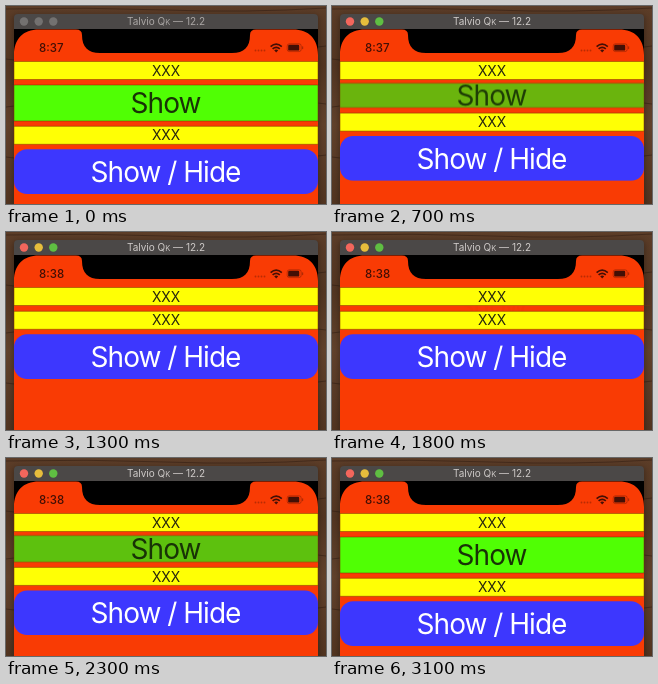
Animation, 320 px wide and 198 px high, one loop 3.2 s. Source, as an HTML page:

```html
<!DOCTYPE html>
<html lang="en">
<head>
<meta charset="utf-8">
<title>Collapsing stack</title>
<style>
  html, body { margin: 0; width: 100%; height: 100%; overflow: hidden; background: #573924; }
  svg { display: block; width: 100%; height: 100%; }
  text { font-family: Inter, Roboto, sans-serif; text-anchor: middle; }

  .wood path { fill: none; stroke: #2c1a10; stroke-width: 1; opacity: .5; }
  .bar { fill: #4b4847; }
  .title { font-size: 10px; fill: #aaa6a4; }
  .lights circle { fill: #737170; }
  .row { fill: #ffff05; }
  .edge { stroke: #7d3200; stroke-opacity: .5; stroke-width: 1; vector-effect: non-scaling-stroke; }
  .label { font-size: 13.8px; fill: #25240e; }
  .big { font-size: 28px; letter-spacing: -.035em; }
  .status { fill: #430f05; }
  .clock { font-size: 11.5px; font-weight: 500; text-anchor: start; }

  .title, .lights circle, .clock, .below, .panel, .caption {
    animation: 3200ms linear infinite;
  }
  .title { animation-name: focus-title; }
  .lights circle { animation-name: focus-light; }
  .before { animation-name: before; }
  .after { animation-name: after; }
  .below { animation-name: slide; animation-timing-function: ease-in-out; }
  .panel { animation-name: fold, tint; animation-timing-function: ease-in-out, linear; }
  .caption { animation-name: lift, fade; animation-timing-function: ease-in-out, linear; }

  @keyframes focus-title { 0%, 18.7% { fill: #aaa6a4 } 18.75%, 100% { fill: #cecac8 } }
  @keyframes focus-light { 0%, 18.7% { fill: #737170 } 18.75%, 100% { fill: var(--on) } }
  @keyframes before { 0%, 34.3% { opacity: 1 } 34.35%, 100% { opacity: 0 } }
  @keyframes after { 0%, 34.3% { opacity: 0 } 34.35%, 100% { opacity: 1 } }

  /* Collapse at 520–980 ms, expand at 1780–2590 ms. */
  @keyframes slide {
    0%, 16.25%, 80.94%, 100% { transform: translateY(0) }
    30.625%, 55.625% { transform: translateY(-41px) }
  }
  @keyframes fold {
    0%, 16.25%, 80.94%, 100% { transform: translateY(79px) scaleY(1) }
    30.625%, 55.625% { transform: translateY(73.5px) scaleY(0) }
  }
  @keyframes lift {
    0%, 16.25%, 80.94%, 100% { transform: translateY(0) }
    30.625%, 55.625% { transform: translateY(-23.5px) }
  }
  @keyframes tint {
    0%, 16.25%, 80.94%, 100% { fill: #50ff04; stroke-opacity: .5 }
    21.4%, 71.875% { fill: #5dc10e; stroke-opacity: .4 }
    26.6%, 62.5% { fill: #e03b04; stroke-opacity: 0 }
    30.625%, 55.625% { fill: #f93b04; stroke-opacity: 0 }
  }
  @keyframes fade {
    0%, 21.4%, 71.875%, 100% { opacity: 1 }
    26.6%, 62.5% { opacity: .14 }
    28.1%, 55.625% { opacity: 0 }
  }
</style>
</head>
<body>
<svg viewBox="0 0 320 198" preserveAspectRatio="none">
  <defs>
    <linearGradient id="wood" x2="0" y2="1">
      <stop offset="0" stop-color="#5c3d28"/>
      <stop offset=".3" stop-color="#533622"/>
      <stop offset=".6" stop-color="#62422c"/>
      <stop offset="1" stop-color="#523521"/>
    </linearGradient>
    <filter id="shadow" x="-10%" y="-10%" width="120%" height="120%">
      <feGaussianBlur stdDeviation="3"/>
    </filter>
  </defs>

  <rect width="320" height="198" fill="url(#wood)"/>
  <g class="wood">
    <path d="M0 3Q80 1 160 4T320 2M0 53L8 54M0 101L8 100M0 151L8 152M312 41L320 40M312 97L320 98M312 150L320 149"/>
  </g>
  <rect x="7" y="9" width="306" height="200" rx="4" opacity=".3" filter="url(#shadow)"/>

  <path class="bar" d="M8 24V12Q8 8 12 8H308Q312 8 312 12V24Z"/>
  <g class="lights">
    <circle cx="18" cy="15.5" r="4.2" style="--on:#f2665c"/>
    <circle cx="32.7" cy="15.5" r="4.2" style="--on:#e6bd3c"/>
    <circle cx="47.3" cy="15.5" r="4.2" style="--on:#5fbe42"/>
  </g>
  <text class="title" x="160" y="19.2">Talvio Q<tspan font-size="7.5">K</tspan> — 12.2</text>

  <rect x="8" y="23" width="304" height="175"/>
  <path fill="#f93b04" d="M8 198V49C8 33 17 23.5 33 23.5H70Q76 23.5 76 29C76 41 82 47 94 47H226C238 47 244 41 244 29Q244 23.5 250 23.5H287C303 23.5 312 33 312 49V198Z"/>

  <g class="status">
    <text class="clock before" x="33" y="46">8:37</text>
    <text class="clock after" x="33" y="46">8:38</text>
    <g opacity=".35">
      <circle cx="249.5" cy="44.5" r=".9"/><circle cx="252.5" cy="44.5" r=".9"/>
      <circle cx="255.5" cy="44.5" r=".9"/><circle cx="258.5" cy="44.5" r=".9"/>
    </g>
    <g fill="none" stroke="#430f05" stroke-width="1.7">
      <path d="M264.6 40.6Q270.2 35.8 275.8 40.6M266.6 42.9Q270.2 39.7 273.8 42.9"/>
    </g>
    <path d="M268.2 44.2Q270.2 42.8 272.2 44.2L270.2 46.5Z"/>
    <rect x="281.2" y="37.8" width="14" height="7.8" rx="2.2" fill="none" stroke="#430f05" stroke-width=".8" opacity=".4"/>
    <rect x="282.2" y="38.8" width="11" height="5.8" rx="1.2"/>
    <rect x="296" y="40.2" width="1.2" height="3" rx=".6" opacity=".4"/>
  </g>

  <rect class="panel edge" x="8" width="304" height="36" fill="#50ff04"/>
  <text class="caption big" x="159.5" y="107.3" fill="#183306">Show</text>

  <rect class="row edge" x="8" y="55.5" width="304" height="18"/>
  <text class="label" x="160" y="69.7">XXX</text>

  <g class="below">
    <rect class="row edge" x="8" y="120.3" width="304" height="18"/>
    <text class="label" x="160" y="134.4">XXX</text>
    <rect x="8" y="143.3" width="304" height="44.7" rx="13" fill="#3d37fe"/>
    <text class="big" x="159.5" y="176" fill="#fff">Show / Hide</text>
  </g>
</svg>
</body>
</html>
```
